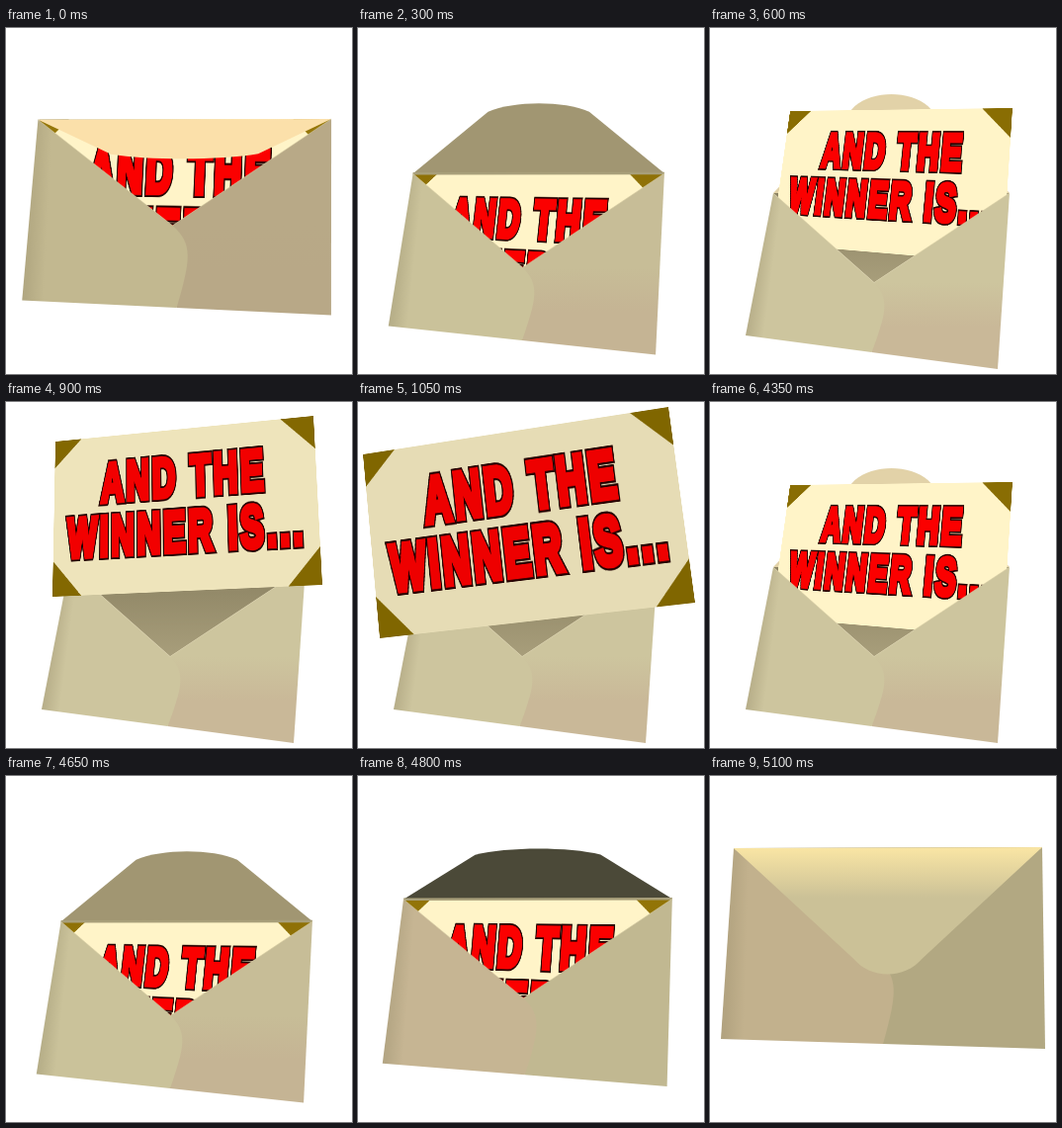
An HTML page for the animation above (7100 ms loop, 350 by 350 pixels).

```html
<!DOCTYPE html>
<html lang="en">
<head>
<meta charset="utf-8">
<title>Envelope</title>
<style>
  html, body { margin: 0; width: 100%; height: 100%; overflow: hidden; background: #fff; }
  #stage { position: relative; width: 350px; height: 350px; overflow: hidden; background: #fff; }
  #stage > svg { position: absolute; left: 0; top: 0; }
  #back { z-index: 1; }
  #card { z-index: 2; transform-origin: 0 0; }
  #front { z-index: 3; }
  #card.out { z-index: 4; }
  #card text {
    font: bold 80px "Liberation Sans", Arial, sans-serif;
    letter-spacing: 7px;
    text-anchor: middle;
    stroke-linejoin: miter;
    stroke-miterlimit: 3;
  }
  .edge { fill: #200; stroke: #200; stroke-width: 13px; }
  .ink { fill: var(--ink); stroke: var(--ink); stroke-width: 8px; }
</style>
</head>
<body>
<div id="stage">
  <svg id="back" width="350" height="350"></svg>
  <svg id="card" width="660" height="270" viewBox="-10 -10 660 270">
    <rect id="paper" width="640" height="250"/>
    <path id="gold" d="M0 0H70L0 45ZM640 0H564L640 50ZM640 250H566L640 195ZM0 250H74L0 195Z"/>
    <g id="words"></g>
  </svg>
  <svg id="front" width="350" height="350"></svg>
</div>
<script>
const $ = id => document.getElementById(id);
const W = 640, H = 250, margin = 10;

// Key quads, corners in order: top left, top right, bottom right, bottom left.
const sealed = [[24, 73], [336, 72], [339, 276], [11, 266]];
const opened = [[64, 167], [303, 167], [291, 345], [36, 311]];
const half = [[81, 84], [306, 81], [296, 238], [62, 218]];
const rising = [[50, 40], [311, 14], [320, 185], [47, 197]];
const full = [[5, 53], [314, 5], [341, 203], [22, 239]];

// Per opening stage: share of the tilt, reach of the flap below its hinge, flap colour.
const swing = [0, 0.21, 0.55, 0.79, 1];
const reach = [128, 40, -51, -71, -100];
const lidTone = ['#cbc197', '#fbe0aa', '#4b4938', '#a19672', '#e2d2a8'];

const mix = (a, b, p) => a + (b - a) * p;
const mixPoint = (a, b, p) => [mix(a[0], b[0], p), mix(a[1], b[1], p)];
const at = (q, u, v) => mixPoint(mixPoint(q[0], q[1], u), mixPoint(q[3], q[2], u), v);
const channels = hex => hex.match(/\w\w/g).map(c => parseInt(c, 16));
function blend(a, b, p) {
  const end = channels(b);
  return '#' + channels(a).map((c, i) =>
    Math.round(mix(c, end[i], p)).toString(16).padStart(2, '0')).join('');
}

// Stages: 0 sealed, 1-3 opening with the card tucked in, 4-6 sliding up, 7-8 out.
function cardQuad(n, env) {
  if (n > 6) return n === 7 ? rising : full;
  if (n > 3) return half.map(([x, y]) => [x + 4 * (n - 5), y - 61 * (n - 5)]);
  return [[0.005, 0], [0.995, 0], [0.98, 0.94], [0.02, 0.94]].map(([u, v]) => at(env, u, v));
}

// Projective map from the flat card to four corners.
function project([[x0, y0], [x1, y1], [x2, y2], [x3, y3]]) {
  const ax = x1 - x2, ay = y1 - y2, bx = x3 - x2, by = y3 - y2;
  const sx = x0 - x1 + x2 - x3, sy = y0 - y1 + y2 - y3;
  const det = ax * by - bx * ay;
  const g = (sx * by - bx * sy) / det, h = (ax * sy - sx * ay) / det;
  const m = [
    (x1 - x0 + g * x1) / W, (y1 - y0 + g * y1) / W, 0, g / W,
    (x3 - x0 + h * x3) / H, (y3 - y0 + h * y3) / H, 0, h / H,
    0, 0, 1, 0, x0, y0, 0, 1];
  return `matrix3d(${m.map(c => c.toFixed(8))}) translate(${-margin}px, ${-margin}px)`;
}

function gradient(id, colors, [x1, y1], [x2, y2]) {
  const stops = colors.map((c, i) =>
    `<stop offset="${i / (colors.length - 1)}" stop-color="${c}"/>`).join('');
  return `<linearGradient id="${id}" gradientUnits="userSpaceOnUse"
    x1="${x1}" y1="${y1}" x2="${x2}" y2="${y2}">${stops}</linearGradient>`;
}

const shape = (d, fill, extra = '') => `<path d="${d}" fill="${fill}" ${extra}/>`;
const line = (d, color, width) => shape(d, 'none', `stroke="${color}" stroke-width="${width}"`);

// The flatter the flap is seen, the wider its rounded end.
function lidArt(k, [tl, tr]) {
  const w = 0.11 + (128 - Math.abs(reach[k])) * 0.0016;
  const p = (u, v) => {
    const [x, y] = mixPoint(tl, tr, u);
    return [x, y + reach[k] * v];
  };
  const d = `M${tl}L${p(0.5 - w, 0.88)}C${p(0.5 - w / 2, 1.04)} ${p(0.5 + w / 2, 1.04)} ${p(0.5 + w, 0.88)}L${tr}Z`;
  const tones = [k ? lidTone[k] : '#f9e5a4', lidTone[k]];
  return gradient('lid', tones, tl, [tl[0], tl[1] + 50]) + shape(d, 'url(#lid)');
}

function hollowArt([tl, tr], tip) {
  return gradient('hollow', ['#8b8262', '#a89e7b'], [0, tl[1]], [0, tip[1]]) +
    shape(`M${tl}L${tr}L${tip}Z`, 'url(#hollow)');
}

function panelArt(k, env, tip) {
  const [tl, tr, br, bl] = env, p = swing[k];
  const moss = blend('#bfb58c', '#cdc59e', p), sand = blend('#c2b18d', '#c9b898', p);
  const swap = k === 0 || k === 2;
  const left = swap ? sand : moss;
  const right = swap ? [moss, moss] : [blend(sand, moss, p), sand];
  const foot = at(env, 0.5, 1);
  const seam = `C${at(env, 0.545, 0.66)} ${at(env, 0.54, 0.74)} ${foot}`;
  const rightPath = `M${tip}L${tr}L${br}L${foot}L${at(env, 0.46, 0.6)}Z`;
  return gradient('left', [blend(left, '#948a68', 0.4), left], bl, mixPoint(bl, br, 0.07)) +
    gradient('right', right, [0, tip[1]], [0, tip[1] + 45]) +
    shape(rightPath, 'url(#right)') +
    shape(rightPath, '#000', `fill-opacity="${0.07 * (1 - p)}"`) +
    shape(`M${tl}L${tip}${seam}L${bl}Z`, 'url(#left)') +
    line(`M${tl}L${tip}L${tr}`, '#d8cda488', 1);
}

function show(n) {
  const k = Math.min(n, 4);
  const env = sealed.map((c, i) => mixPoint(c, opened[i], swing[k]));
  const tip = at(env, 0.475, 0.565);
  const lid = lidArt(k, env), lidBehind = reach[k] < 0;
  const rim = lidBehind && n < 4 ? line(`M${env[0]}L${env[1]}`, '#a89f7a', 2.5) : '';
  $('back').innerHTML = (lidBehind ? lid : '') + hollowArt(env, tip);
  $('front').innerHTML = rim + panelArt(k, env, tip) + (lidBehind ? '' : lid);

  const card = $('card'), aged = Math.max(0, (n - 5) / 3);
  card.style.display = n ? 'block' : 'none';
  card.style.transform = project(cardQuad(n, env));
  card.style.setProperty('--ink', blend('#fb0000', '#ee0000', aged));
  card.classList.toggle('out', n > 6);
  $('paper').setAttribute('fill', blend('#fff4c8', '#e6dcb5', aged));
  $('gold').setAttribute('fill', blend('#987809', '#806600', n / 8));
}

$('words').innerHTML = [['AND THE', 325, 105], ['WINNER IS...', 324, 190]]
  .map(([s, x, y]) => ['edge', 'ink'].map(c =>
    `<text class="${c}" transform="translate(${x} ${y}) scale(1 1.08)">${s}</text>`).join('')).join('');

// Out and back again, then a rest while sealed.
const out = [1, 2, 3, 4, 5, 6, 7];
const order = [...out, 8, ...out.slice().reverse(), 0];
const hold = n => n === 8 ? 3000 : n === 0 ? 2000 : 150;
const loop = order.reduce((sum, n) => sum + hold(n), 0);

let shown = -1;
function tick() {
  let t = performance.now() % loop, i = 0;
  while (t >= hold(order[i])) t -= hold(order[i++]);
  if (order[i] !== shown) show(shown = order[i]);
  requestAnimationFrame(tick);
}
tick();
</script>
</body>
</html>
```
